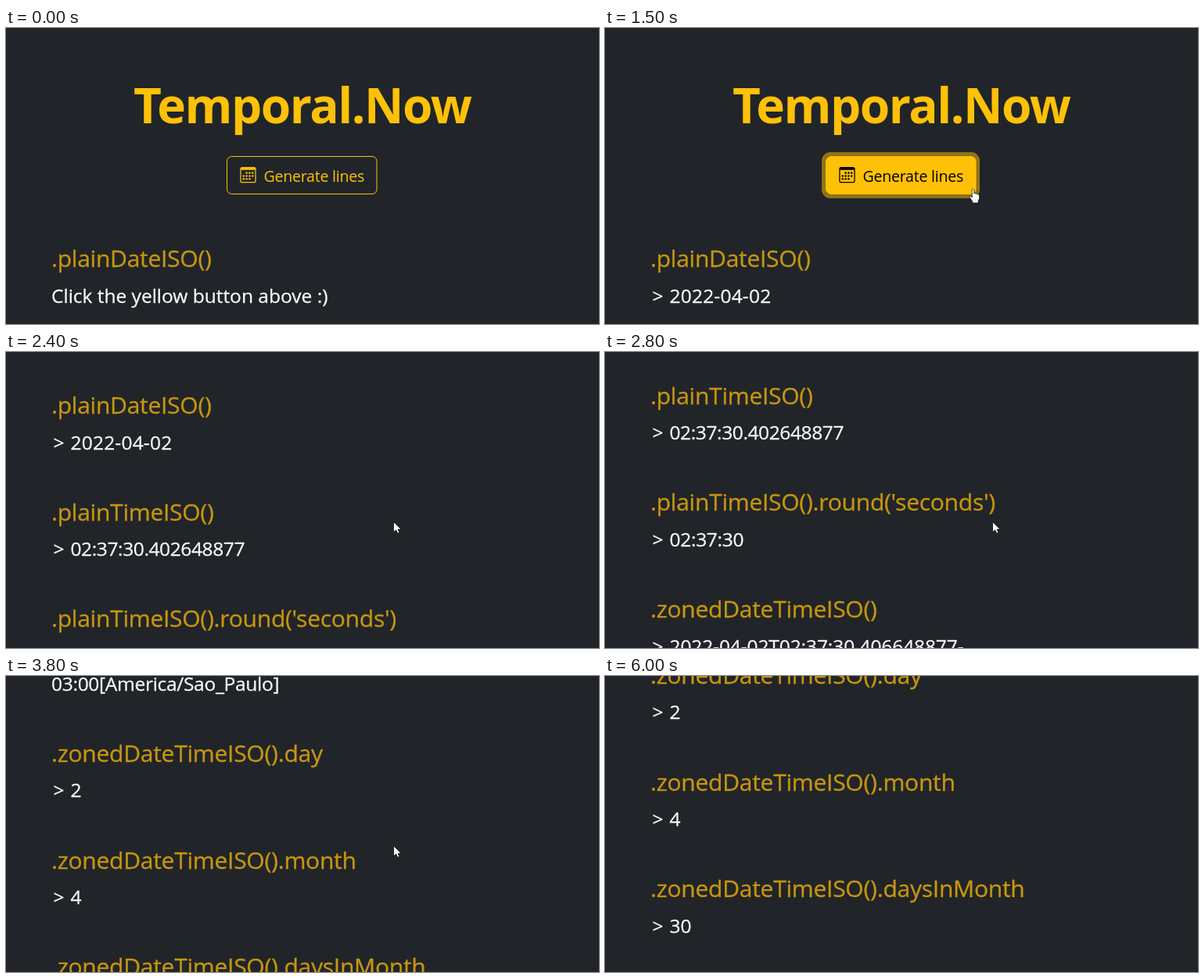
An HTML page for the animation above (6600 ms loop, 758 px wide and 379 px high).

```html
<!DOCTYPE html>
<html lang="en">
<head>
<meta charset="utf-8">
<title>Temporal.Now</title>
<style>
  html, body { margin: 0; width: 100%; height: 100%; overflow: hidden; background: #212529; }
  svg { display: block; width: 758px; height: 379px; font-family: "Open Sans", "Noto Sans", sans-serif; }
  text { white-space: pre; }
  .title { font-size: 62px; font-weight: 700; letter-spacing: -1.4px; fill: #ffc107; }
  .label { font-size: 19.5px; letter-spacing: -.2px; }
  .head { font-size: 30px; letter-spacing: -.26px; fill: #c8960f; stroke: #c8960f; stroke-width: .3px; }
  .value { font-size: 24.5px; fill: #f8f9fa; stroke: #f8f9fa; stroke-width: .3px; }
</style>
</head>
<body>
<svg viewBox="0 0 758 379">
  <rect width="758" height="379" fill="#212529"/>
  <g id="page">
    <text class="title" x="163" y="122">Temporal.Now</text>
    <rect id="ring" x="279.5" y="161.5" width="197" height="54" rx="8.5" fill="none" stroke="#ffc107" stroke-width="5"/>
    <g id="button">
      <rect id="face" x="282.5" y="164.5" width="191.5" height="48" rx="6" stroke="#ffc107"/>
      <g id="icon" transform="translate(299.3 178) scale(1.27)" fill="currentColor">
        <rect x=".5" y=".5" width="15" height="15" rx="1.5" fill="none" stroke="currentColor"/>
        <rect x=".5" y=".5" width="15" height="2.5" rx="1"/>
      </g>
      <text class="label" x="329.5" y="197" fill="currentColor">Generate lines</text>
    </g>
  </g>
  <g id="arrow" fill="#fff" stroke="#000" stroke-width=".7">
    <path d="M-.5-.5V12.5L2.7 9.9L4.7 14.2L6.9 13.2L5 9.1H9Z"/>
  </g>
  <g id="hand" fill="#fff" stroke="#000" stroke-width=".7" stroke-linejoin="round">
    <path d="M-1.3 1Q0-1 1.3 1V6Q2.7 5 3.7 6.3Q5 5.6 6 7Q7.8 6.6 8 8.6V12.5L6.5 15.5V18H-.8V16L-4.4 10.8Q-4.6 9-3 9.2L-1.3 11Z"/>
  </g>
</svg>
<script>
const LOOP = 6600, STEP = 100, LEFT = 58;
const $ = id => document.getElementById(id);

function add(parent, tag, attrs, text = '') {
  const el = document.createElementNS('http://www.w3.org/2000/svg', tag);
  for (const key in attrs) el.setAttribute(key, attrs[key]);
  el.textContent = text;
  return parent.appendChild(el);
}

// calendar days: first row starts late, last row ends early
for (let i = 1; i < 11; i++) {
  add($('icon'), 'circle', { cx: 3.5 + 3 * (i % 4), cy: 6 + 3 * Math.floor(i / 4), r: 1 });
}

// heading, value, letter spacing, optional wrapped line
const items = [
  ['.plainDateISO()', '2022-04-02', .2],
  ['.plainTimeISO()', '02:37:30.402648877', -.4],
  [".plainTimeISO().round('seconds')", '02:37:30', -.3],
  ['.zonedDateTimeISO()', '2022-04-02T02:37:30.406648877-', -.1, '03:00[America/Sao_Paulo]'],
  ['.zonedDateTimeISO().day', '2', 0],
  ['.zonedDateTimeISO().month', '4', 0],
  ['.zonedDateTimeISO().daysInMonth', '30', 0]
];

const results = [];
let y = 306;
for (const [head, value, gap, rest] of items) {
  const line = (x, dy, text, spacing) =>
    add(group, 'text', { class: 'value', x, y: y + dy, 'letter-spacing': spacing }, text);
  add($('page'), 'text', { class: 'head', x: LEFT, y }, head);
  const group = add($('page'), 'g', {});
  line(LEFT + 2.5, 45.5, '>', 0);
  line(LEFT + 24.5, 45.5, value, gap);
  if (rest) line(LEFT, 83.5, rest, -.3);
  results.push(group);
  y += 136.7 + (rest ? 38 : 0);
}
const prompt = add($('page'), 'text', { class: 'value', x: LEFT, y: 351.5 }, 'Click the yellow button above :)');

// [time, scroll offset]
const scroll = [
  [0, 0], [2000, 12], [2100, 62], [2200, 118], [2300, 176], [2400, 227],
  [2500, 270], [2600, 312], [2700, 348], [2800, 376], [2900, 390],
  [3100, 405], [3200, 438], [3300, 481], [3400, 527], [3500, 608],
  [3600, 692], [3700, 766], [3800, 781], [4300, 812], [4400, 859], [4500, 881]
];

// [time, x, y, shape]
const pointer = [
  [0, 0, 0, ''], [400, 476, 352, 'arrow'], [500, 494, 329, 'arrow'],
  [600, 510, 308, 'arrow'], [700, 518, 298, 'arrow'], [1000, 512, 282, 'arrow'],
  [1100, 497, 250, 'arrow'], [1200, 480, 222, 'arrow'], [1300, 470.5, 206, 'hand'],
  [1900, 483, 212, 'arrow'], [2000, 496, 218, 'arrow'], [5500, 512, 184, 'arrow'],
  [5600, 542, 132, 'arrow'], [5700, 582, 106, 'arrow'], [5800, 624, 178, 'arrow'],
  [5900, 652, 306, 'arrow'], [6000, 0, 0, '']
];

const at = (table, t) => table.findLast(row => row[0] <= t);
const show = (el, on) => el.setAttribute('visibility', on ? 'visible' : 'hidden');

function draw(now) {
  const t = Math.floor((now % LOOP) / STEP) * STEP;
  $('page').setAttribute('transform', `translate(0 ${-at(scroll, t)[1]})`);

  const [, px, py, shape] = at(pointer, t);
  for (const id of ['arrow', 'hand']) {
    show($(id), id === shape);
    $(id).setAttribute('transform', `translate(${px} ${py})`);
  }

  const hover = shape === 'hand';
  $('face').setAttribute('fill', hover ? '#ffc107' : '#212529');
  $('button').style.color = hover ? '#000' : '#ffc107';
  $('ring').setAttribute('stroke-opacity', t < 1400 ? 0 : t < 1500 ? .25 : .5);

  const done = t >= 1500;
  show(prompt, !done);
  results.forEach(group => show(group, done));
}

const start = performance.now();
function frame() {
  draw(performance.now() - start);
  requestAnimationFrame(frame);
}
draw(0);
requestAnimationFrame(frame);
</script>
</body>
</html>
```
